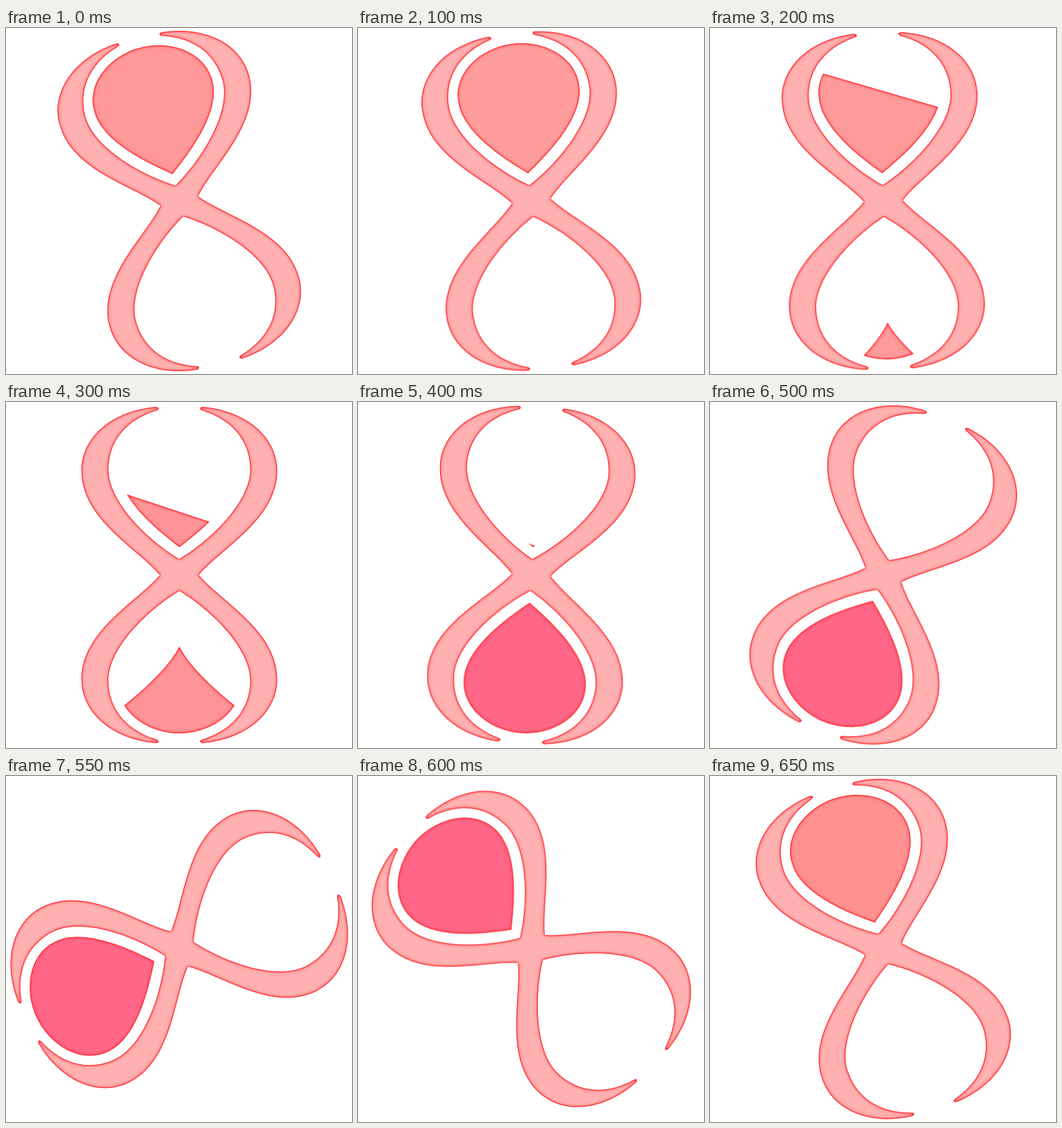
Recreate the animation shown at these times as an HTML page. Size 498x498 px, loop 700 ms.

```html
<!DOCTYPE html>
<html lang="en">
<head>
<meta charset="utf-8">
<title>Hourglass</title>
<style>
  html, body { margin: 0; width: 100%; height: 100%; overflow: hidden; background: #fff; }
  svg { display: block; width: 498px; height: 498px; }
</style>
</head>
<body>
<svg viewBox="0 0 498 498">
  <defs>
    <!-- red rim plus a soft glow inside every shape -->
    <filter id="rim" filterUnits="userSpaceOnUse" x="0" y="0" width="498" height="498" color-interpolation-filters="sRGB">
      <feFlood flood-color="#ff2a30" result="red"/>
      <feGaussianBlur in="SourceAlpha" stdDeviation="2.6" result="soft"/>
      <feComposite in="red" in2="soft" operator="out" result="glow"/>
      <feGaussianBlur in="SourceAlpha" stdDeviation="1.5"/>
      <feComponentTransfer result="core">
        <feFuncA type="linear" slope="2.6" intercept="-1.5"/>
      </feComponentTransfer>
      <feComposite in="red" in2="core" operator="out" result="line"/>
      <feMerge result="edge">
        <feMergeNode in="SourceGraphic"/>
        <feMergeNode in="glow"/>
        <feMergeNode in="line"/>
      </feMerge>
      <feComposite in="edge" in2="SourceAlpha" operator="in"/>
    </filter>
    <path id="arm" d="M-28,0 C-60,-38 -141,-80 -141,-150 C-141,-198 -97,-237 -33,-242
      Q-27,-240 -32,-237 C-82,-222 -102,-187 -102,-152 C-102,-105 -45,-50 0,-23 L20,0 L0,20 Z"/>
    <path id="bulb" d="M0,-40 C-30,-63 -88,-109 -88,-156 C-88,-200 -43,-228 0,-228
      C43,-228 88,-200 88,-156 C88,-109 30,-63 0,-40 Z"/>
    <clipPath id="top"><use href="#bulb"/></clipPath>
    <clipPath id="bottom"><use href="#bulb" transform="scale(1 -1)"/></clipPath>
  </defs>
  <g filter="url(#rim)">
    <g id="glass">
      <g fill="#ffb0b0">
        <use href="#arm"/>
        <use href="#arm" transform="scale(-1 1)"/>
        <use href="#arm" transform="scale(1 -1)"/>
        <use href="#arm" transform="scale(-1 -1)"/>
      </g>
      <g id="sand">
        <g clip-path="url(#top)"><path id="rest"/></g>
        <g clip-path="url(#bottom)"><path id="heap"/></g>
      </g>
    </g>
  </g>
</svg>
<script>
  const STEP = 50;
  const FULL = -300, EMPTY = 9, NONE = 260, HEAP = -60;
  const angles = [-13.9, -10, -6.7, -4, -2, -0.8, 0, 1.3, 3.5, 10, 22.1, 64, 134, 162.3];
  // sand flows from steps 3 to 8
  const levels = [-190, -160, -127, -91, -62, -43];
  const peaks = [208, 175, 140, 103, 60, HEAP];
  const tints = ['#ff9c9c', '#ff9a9a', '#ff989a', '#ff9498', '#ff7d90', '#ff6688'];

  const [glass, sand, rest, heap] = ['glass', 'sand', 'rest', 'heap'].map(id => document.getElementById(id));

  const upper = y => `M-100,${y - 33} L100,${y + 33} V0 H-100 Z`;
  const lower = y => `M0,${y} Q20,${y + 39} 90,${y + 93} V400 H-90 V${y + 93} Q-20,${y + 39} 0,${y} Z`;

  function sandAt(i) {
    if (i < 3) return [FULL, NONE, i ? '#ff9c9c' : '#ff9898'];
    if (i > 8) return [EMPTY, HEAP, i < 13 ? '#ff6688' : '#ff9090'];
    return [levels[i - 3], peaks[i - 3], tints[i - 3]];
  }

  function draw(now) {
    const i = Math.floor(now / STEP) % angles.length;
    const [level, peak, tint] = sandAt(i);
    glass.setAttribute('transform', `translate(249.5 249) rotate(${angles[i]})`);
    rest.setAttribute('d', upper(level));
    heap.setAttribute('d', lower(peak));
    sand.setAttribute('fill', tint);
  }

  function tick() {
    draw(performance.now());
    requestAnimationFrame(tick);
  }
  tick();
</script>
</body>
</html>
```
